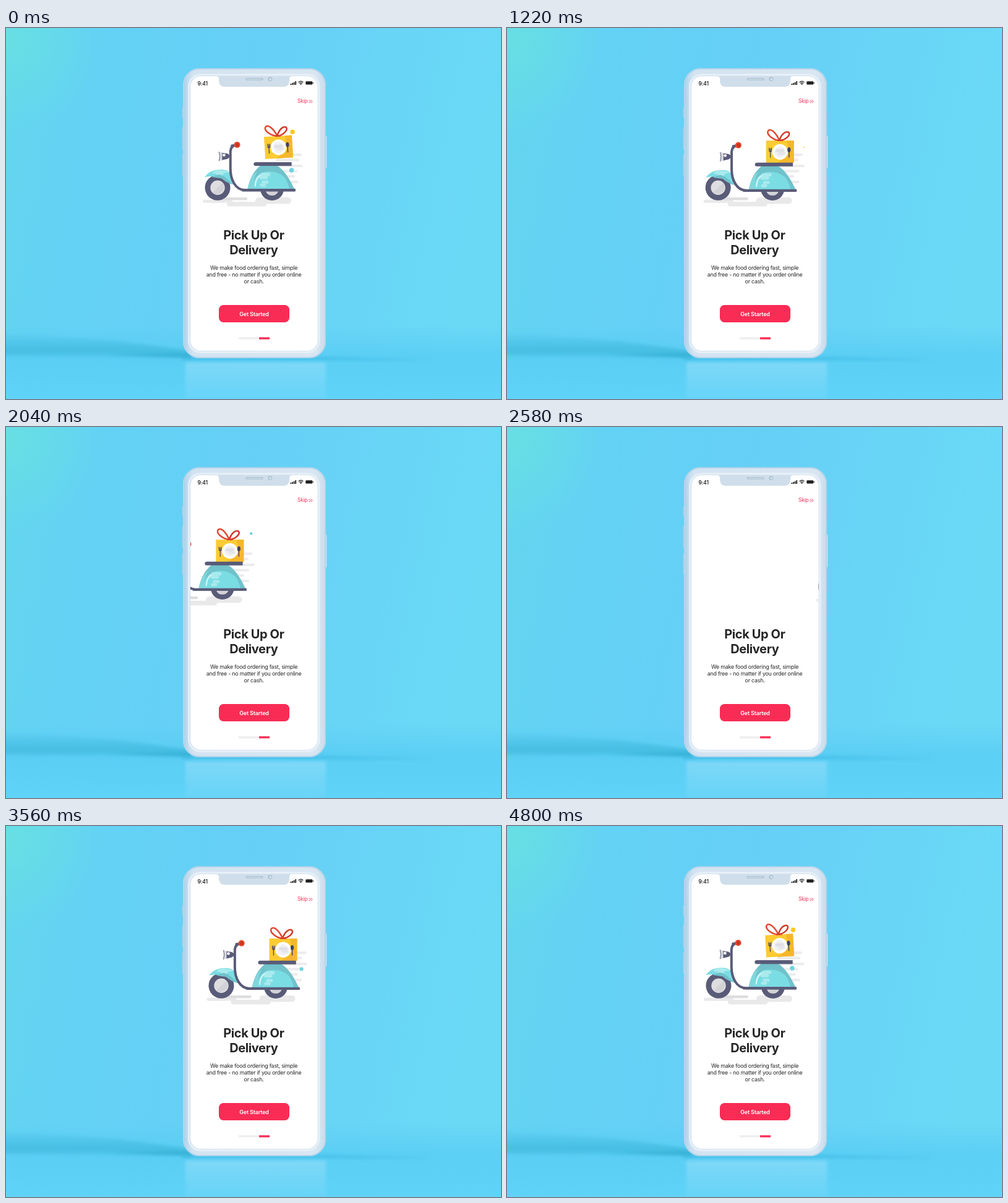
An HTML page with a canvas that plays this animation: 800 px wide and 600 px high, repeating every 4.82 s.

```html
<!DOCTYPE html>
<html lang="en">
<head>
<meta charset="utf-8">
<title>Pick Up Or Delivery</title>
<style>
html, body { margin: 0; width: 100%; height: 100%; overflow: hidden; background: #64d0f5; }
svg, canvas { position: absolute; left: 0; top: 0; width: 800px; height: 600px; display: block; }
text { font-family: Inter, Roboto, sans-serif; fill: #262626; }
.mid { text-anchor: middle; }
.title { font-size: 20px; font-weight: 700; letter-spacing: -.38px; }
.body { font-size: 8.9px; letter-spacing: -.22px; }
</style>
</head>
<body>
<svg viewBox="0 0 800 600">
  <defs>
    <linearGradient id="wall" x2="1" y2=".15">
      <stop offset="0" stop-color="#64d6ee"/><stop offset=".2" stop-color="#63d2f4"/>
      <stop offset=".5" stop-color="#66cff6"/><stop offset="1" stop-color="#6ad9f6"/>
    </linearGradient>
    <radialGradient id="corner" gradientUnits="userSpaceOnUse" cx="0" cy="20" r="150">
      <stop offset="0" stop-color="#67dfe3"/><stop offset="1" stop-color="#67dfe3" stop-opacity="0"/>
    </radialGradient>
    <linearGradient id="floor" x2="0" y2="1">
      <stop offset="0" stop-color="#5acdf3" stop-opacity="0"/><stop offset=".4" stop-color="#58cdf4" stop-opacity=".8"/>
      <stop offset="1" stop-color="#60d3f8"/>
    </linearGradient>
    <linearGradient id="band" x2="0" y2="1">
      <stop offset="0" stop-color="#3fb8dd" stop-opacity="0"/><stop offset=".7" stop-color="#3fb8dd" stop-opacity=".75"/>
      <stop offset="1" stop-color="#3fb8dd" stop-opacity="0"/>
    </linearGradient>
    <linearGradient id="mirror" x2="0" y2="1">
      <stop offset="0" stop-color="#8cdcf8" stop-opacity=".75"/><stop offset="1" stop-color="#80dafa" stop-opacity=".25"/>
    </linearGradient>
    <linearGradient id="shell">
      <stop offset="0" stop-color="#a9cfe9"/><stop offset=".035" stop-color="#c3dcef"/>
      <stop offset=".07" stop-color="#d3e3f1"/><stop offset=".93" stop-color="#d9e6f2"/>
      <stop offset="1" stop-color="#cadcec"/>
    </linearGradient>
    <filter id="soft" x="-20%" y="-100%" width="140%" height="300%"><feGaussianBlur stdDeviation="2.5"/></filter>
    <filter id="edge"><feGaussianBlur stdDeviation=".7"/></filter>
  </defs>
  <rect width="800" height="600" fill="url(#wall)"/>
  <rect width="160" height="180" fill="url(#corner)"/>
  <rect y="480" width="800" height="120" fill="url(#floor)"/>
  <path d="M-20 492L180 506L300 522V536L150 532L-20 531Z" fill="url(#band)" filter="url(#soft)"/>
  <path d="M165 528L300 525V534Z" fill="#2faace" opacity=".65" filter="url(#soft)"/>
  <path d="M285 532H520L690 537H285Z" fill="#36b3df" opacity=".55" filter="url(#soft)"/>
  <path d="M290 541H517V600H290Z" fill="url(#mirror)" filter="url(#soft)"/>

  <g fill="#a9cce4">
    <rect x="284.5" y="128" width="3" height="17" rx="1"/><rect x="284.5" y="160" width="3" height="36" rx="1"/>
    <rect x="284.5" y="204" width="3" height="35" rx="1"/>
  </g>
  <rect x="515" y="174" width="3.2" height="53" rx="1" fill="#d3e4f0"/>
  <rect x="286" y="65" width="231" height="469" rx="27" fill="url(#shell)"/>
  <rect x="287" y="66" width="229" height="467" rx="26" fill="none" stroke="#b5d4ea" stroke-width="2" filter="url(#edge)"/>
  <rect x="295.5" y="75.5" width="210.5" height="449" rx="19" fill="none" stroke="#e6eff7" stroke-width="3" filter="url(#edge)"/>
  <rect x="298" y="78" width="205.5" height="444" rx="17" fill="#fff"/>
  <path d="M339 78Q344 78 344 82V85Q344 95 354 95H448Q458 95 458 85V82Q458 78 463 78Z" fill="#cfdeea"/>
  <rect x="387.5" y="81" width="28" height="3.4" rx="1.7" fill="#a9bdcc"/>
  <rect x="389" y="82.2" width="25" height="1.2" rx=".6" fill="#d9e5ee"/>
  <circle cx="426.8" cy="82.6" r="3.4" fill="#a9bfd0"/><circle cx="427.2" cy="82.8" r="1.9" fill="#d8e6f0"/>

  <text x="309.5" y="93" font-size="8.4" font-weight="600" letter-spacing="-.15">9:41</text>
  <g fill="#202020">
    <rect x="459.5" y="90" width="1.8" height="2" rx=".5"/><rect x="462.1" y="88.8" width="1.8" height="3.2" rx=".5"/>
    <rect x="464.7" y="87.4" width="1.8" height="4.6" rx=".5"/><rect x="467.3" y="86" width="1.8" height="6" rx=".5"/>
    <rect x="484.3" y="86.2" width="11" height="5.4" rx="1.3"/><rect x="495.8" y="87.8" width="1" height="2.2" rx=".5"/>
    <path d="M476.5 92L474.9 90.3Q476.5 89 478.1 90.3Z"/>
  </g>
  <path d="M472.6 87.9Q476.5 84.5 480.4 87.9M474 89.6Q476.5 87.4 479 89.6" fill="none" stroke="#202020" stroke-width="1.2"/>
  <text x="471" y="121" font-size="8.3" letter-spacing="-.1" style="fill:#f62c56">Skip</text>
  <path d="M489.8 116.2L492 118.8L489.8 121.4M492.7 116.2L494.9 118.8L492.7 121.4" fill="none" stroke="#f62c56" stroke-width=".9"/>

  <text class="mid title" x="400.3" y="342">Pick Up Or</text>
  <text class="mid title" x="400.3" y="366">Delivery</text>
  <text class="mid body" x="400.6" y="390.7">We make food ordering fast, simple</text>
  <text class="mid body" x="400.6" y="401.8">and free - no matter if you order online</text>
  <text class="mid body" x="400.6" y="412.8">or cash.</text>
  <rect x="344" y="448" width="114" height="28" rx="7.5" fill="#f92c55"/>
  <text class="mid" x="401" y="465.5" font-size="9" font-weight="600" letter-spacing="-.18" style="fill:#fff">Get Started</text>
  <rect x="376" y="500.2" width="33" height="3.3" fill="#eeeef0"/><rect x="409" y="500.2" width="17" height="3.3" fill="#f92c55"/>
</svg>
<canvas id="stage" width="800" height="600"></canvas>
<script>
const ctx = document.getElementById('stage').getContext('2d');
const LOOP = 4820;
const DARK = '#595b78', TEAL = '#7bdde4', DEEP = '#70c2cb', PALE = '#a9eaed', GRAY = '#e9e9ea';

// Ride keys: time, offset, speed (px per ms).
const leave = [[1080, 0, 0], [1620, -10, -.05], [1720, -16, -.075], [2160, -124, -.42], [2340, -205, -.46]];
const arrive = [[2560, 191, -.44], [3100, 38, -.12], [3200, 27.8, -.095], [3640, 4.5, -.02], [4000, 0, 0]];

function follow(keys, t) {
  if (t <= keys[0][0]) return keys[0][1];
  for (let i = 1; i < keys.length; i++) {
    const [t1, x1, v1] = keys[i];
    if (t > t1) continue;
    const [t0, x0, v0] = keys[i - 1];
    const d = t1 - t0, u = (t - t0) / d, w = 1 - u;
    return x0 * w * w * (1 + 2 * u) + v0 * d * u * w * w + x1 * u * u * (3 - 2 * u) - v1 * d * u * u * w;
  }
  return keys[keys.length - 1][1];
}

const ride = t => t < 2450 ? follow(leave, t) : follow(arrive, t);

function bump(d) {
  const u = d / (d < 0 ? 120 : 300);
  return Math.abs(u) < 1 ? Math.cos(u * Math.PI / 2) ** 2 : 0;
}
const hop = t => bump(t - 3010) + bump(t - 4825) + bump(t - 5);

function fill(d, color) {
  ctx.fillStyle = color;
  ctx.fill(new Path2D(d));
}
function line(d, color, width, cap = 'butt') {
  ctx.strokeStyle = color;
  ctx.lineWidth = width;
  ctx.lineCap = cap;
  ctx.stroke(new Path2D(d));
}
function disc(x, y, r, color) {
  ctx.fillStyle = color;
  ctx.beginPath();
  ctx.arc(x, y, Math.max(r, 0), 0, 7);
  ctx.fill();
}
function bar(x0, x1, y, h, color = GRAY) {
  ctx.fillStyle = color;
  ctx.beginPath();
  ctx.roundRect(x0, y - h / 2, x1 - x0, h, h / 2);
  ctx.fill();
}

function ground() {
  bar(318, 366, 280.3, 5);
  bar(345, 390, 276.2, 4.6, '#dedee0');
  bar(357, 421, 284.8, 7.6);
  bar(403, 461, 279.3, 10.5);
}

function streaks(t) {
  const ends = [[205, 478], [213.5, 473], [223, 480.5], [231.5, 472], [240, 466], [249, 473]];
  ends.forEach(([y, x], i) => bar(436, x + 1.5 * Math.sin(t / 130 + i * 1.9), y, 4.2, '#ececee'));
}

// Puffs drift backwards: time, height, colour.
const puffs = [
  [4820, 168, '#ffc71f'], [640, 190, '#ffc71f'], [1610, 170, '#6ed3e0'],
  [3890, 170, '#6ed3e0'], [3290, 230, '#6ed3e0'], [4870, 230, '#6ed3e0']
];
function drawPuffs(t) {
  for (const [start, y, color] of puffs) {
    for (const d of [t - start, t - start + LOOP]) {
      if (d < -250 || d > 680) continue;
      const r = d < 0 ? 3.7 * Math.min(1, (d + 250) / 100) : 3.7 * (1 - (d / 680) ** 2);
      disc(463 + d * .03, y + Math.max(d, 0) * .005, r, color);
    }
  }
}

function gift(h, t) {
  ctx.save();
  ctx.translate(441.5 - h, 200 - 7.3 * h + .4 * Math.sin(t / 95) * (1 - h));
  ctx.rotate(-.06 * h);
  line('M-1 -18C-11 -19 -23 -28 -19 -34C-14 -39 -5 -28 -1 -18', '#e2462f', 2.5);
  line('M-1 -18C2 -28 9 -34 14 -31.5C18 -28 10 -19 -1 -18', '#d33a29', 2.5);
  fill('M-22.5 -18H22.5V18H-22.5Z', '#fdcb33');
  fill('M11 -18H22.5V18H-5L9 10L15 2Z', '#f5b72c');
  fill('M-4 -19.5H4L5 -17H-5Z', '#d8412c');
  disc(0, .2, 12.6, '#fff');
  disc(0, .2, 9, '#f1f1f4');
  bar(-7, 7, -1.5, 5, '#dfe0e6');
  bar(-3, 9, 3, 4.5, '#e5e5ea');
  line('M-15.6 -5V9M-17.4 -6V-2Q-17.4 0 -15.6 0Q-13.8 0 -13.8 -2V-6', '#3d4266', 1.2, 'round');
  ctx.fillStyle = '#3d4266';
  ctx.beginPath();
  ctx.ellipse(14.6, -3.2, 2.6, 4, 0, 0, 7);
  ctx.fill();
  line('M14.6 0V9', '#3d4266', 1.4, 'round');
  ctx.restore();
}

function wheel(x, y, r) {
  disc(x, y, r, DARK);
  disc(x, y, r * .57, '#dedee1');
  fill(`M${x - 8} ${y + 8}A11.4 11.4 0 0 0 ${x + 8} ${y - 8}Z`, '#d2d2d7');
}

function scooter(h) {
  ctx.save();
  ctx.translate(h * .5, 0);
  wheel(341.5, 258.2, 20.5);
  wheel(429.5, 260, 19);
  ctx.restore();

  ctx.save();
  ctx.translate(-h * .7, -h * .7);
  fill('M321.5 242C327 234 336 229.8 347 229.8C356 229.8 362 232 364 238L370 255C361 251 355 242 340 241.5C333 240 327 240.5 321.5 242Z', TEAL);
  fill('M337 232Q346 229 354 232Q360 232 360 235H355Q351 236 351 239H340Q338 237 342 236H334Z', PALE);
  fill('M334 242Q340 237 347 238Q358 242 367 254Q357 251 349 244Z', DEEP);

  fill('M391 262C394 244 402 231 412 223H438C451 230 460 247 467 262Z', DEEP);
  fill('M399 262C399 246 408 234 422 233C443 231 456 244 466 262Z', TEAL);
  fill('M391 262C394 248 398 238 407 232C402 241 400 250 400 262Z', '#80d7dc');
  line('M403.5 256C404 247 408 239 417 236.5', '#d8f6f6', 2.2, 'round');
  bar(412, 428, 237.5, 5.5, PALE);
  bar(410, 424, 242.5, 5.5, PALE);
  bar(414, 425, 250, 5, PALE);
  bar(411, 421, 255, 5, PALE);
  fill('M440 226C451 232 460 247 467 262H459C456 248 448 235 436 226Z', DEEP);

  line('M373 189.7Q364 191 363.4 200V229C363.5 245 371 262.8 387 262.8H468.5', DARK, 4);
  line('M382 263H468', DARK, 4.2);
  line('M365.5 190.8L373 189.6', DARK, 3.2, 'round');
  disc(374.2, 189.6, 5, '#e5492f');
  disc(374.5, 189.6, 2.8, '#c9341f');
  fill('M349.5 202.5L358 203.8Q362 205 362 208.2Q361 212.5 356 213L349.5 214.4Z', DARK);
  fill('M345.2 200.8L350 202V214.2L345.2 215.8Q347 208 345.2 200.8Z', '#d9dbe0');
  line('M345 200.8Q347.5 208 345 215.8', DARK, 1);
  disc(353, 206.3, 2.4, '#f4f4f7');
  fill('M404.5 217.7H462.3V223.8H403.8Q401 223.6 401 221Q401 217.7 404.5 217.7Z', DARK);
  ctx.restore();
}

function draw(t) {
  ctx.clearRect(0, 0, 800, 600);
  const h = hop(t);
  ctx.save();
  ctx.beginPath();
  ctx.roundRect(298, 78, 205.5, 444, 17);
  ctx.clip();
  ctx.translate(ride(t), 0);
  ground();
  streaks(t);
  drawPuffs(t);
  gift(h, t);
  scooter(h);
  ctx.restore();
}

const start = performance.now();
function tick() {
  draw((performance.now() - start) % LOOP);
  requestAnimationFrame(tick);
}
tick();
</script>
</body>
</html>
```
